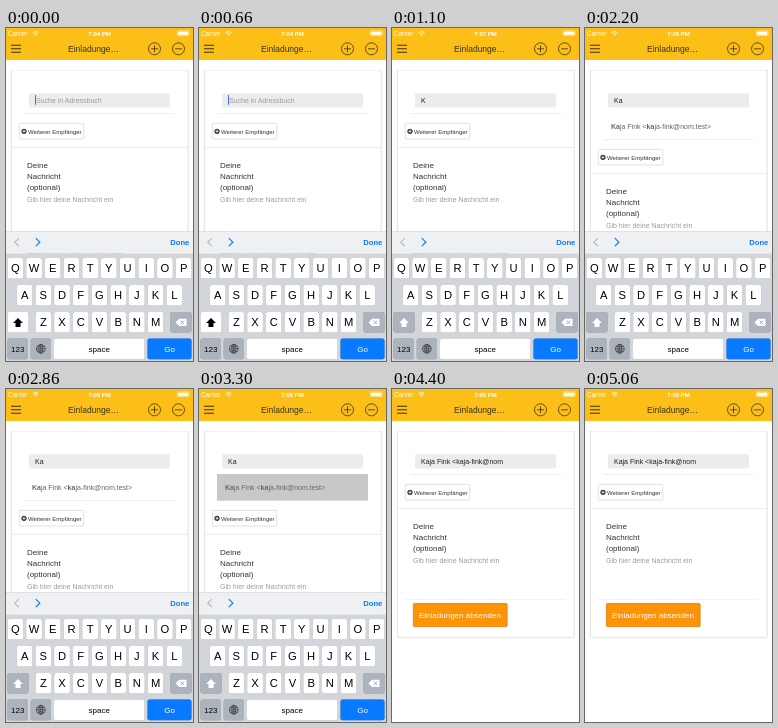
An HTML page that plays this animation: 187 px wide and 333 px high, repeating every 5.5 s.

```html
<!DOCTYPE html>
<html lang="de">
<head>
<meta charset="utf-8">
<title>Einladungen</title>
<style>
html, body { margin: 0; width: 100%; height: 100%; overflow: hidden; background: #fff; }
svg { display: block; width: 100%; height: 100%; }
text { font-family: "Liberation Sans", Arial, sans-serif; font-size: 7px; white-space: pre; }
.mid { text-anchor: middle; }
.bold { font-weight: 700; }
.line { fill: none; stroke: #3b3217; stroke-width: .8; }
.hint { fill: #9b9b9b; }
.label { font-size: 8px; fill: #333; }
.panel { fill: #fff; filter: drop-shadow(0 .7px .7px #0004); }
.key { filter: drop-shadow(0 .7px 0 #868a90); }
.letter { font-size: 11.2px; text-anchor: middle; }
.cap { font-size: 8px; text-anchor: middle; }

/* --from: first step of five, the class sets how many steps it stays */
.for1, .for2, .for3, .for4 {
  animation: 5.5s step-end calc((var(--from) - 5) * 1.1s) infinite;
}
.for1 { animation-name: one; }
.for2 { animation-name: two; }
.for3 { animation-name: three; }
.for4 { animation-name: four; }
@keyframes one   { 0% { visibility: visible } 20%, 100% { visibility: hidden } }
@keyframes two   { 0% { visibility: visible } 40%, 100% { visibility: hidden } }
@keyframes three { 0% { visibility: visible } 60%, 100% { visibility: hidden } }
@keyframes four  { 0% { visibility: visible } 80%, 100% { visibility: hidden } }

#form { animation: push 5.5s step-end infinite; }
@keyframes push {
  0%, 80%, 100% { transform: translateY(0) }
  40% { transform: translateY(26px) }
}
</style>
</head>
<body>
<svg viewBox="0 0 187 333" preserveAspectRatio="none">
  <rect width="187" height="333" fill="#fff"/>

  <!-- card -->
  <g id="form">
    <path d="M5.3 15V247.3Q5.3 248.3 6.3 248.3H181.2Q182.2 248.3 182.2 247.3V15" fill="none" stroke="#dadada" stroke-width=".8"/>
    <path d="M6 249H181.5" stroke="#eee" stroke-width=".7"/>
    <rect x="13.3" y="95.4" width="64.4" height="15.6" rx=".8" fill="#fff" stroke="#d5d5d5" stroke-width=".7"/>
    <circle cx="18" cy="103.3" r="2.6" fill="#333"/>
    <path d="M16.5 103.3h3M18 101.8v3" stroke="#fff" stroke-width=".8"/>
    <text x="22" y="105.5" style="font-size:6px" fill="#333">Weiterer Empfänger</text>
    <path d="M5.5 119.4H182" stroke="#e2e2e2" stroke-width=".7"/>
    <text class="label" x="21" y="140">Deine</text>
    <text class="label" x="21" y="151.2">Nachricht</text>
    <text class="label" x="21" y="162.2">(optional)</text>
    <text class="hint" x="21" y="173.5">Gib hier deine Nachricht ein</text>
    <path d="M13 210.5H174" stroke="#ddd" stroke-width=".6" stroke-dasharray="1.5 1"/>
    <rect x="21.4" y="214.4" width="93.7" height="23.2" rx="1" fill="#fd9408" stroke="#dd7d05" stroke-width=".8"/>
    <text x="27" y="229.3" style="font-size:8px" fill="#fff">Einladungen absenden</text>
  </g>
  <rect y="32" width="187" height="10" fill="#fff"/>
  <path d="M5.5 42.5H182" stroke="#ddd" stroke-width=".6" stroke-dasharray="1.5 1"/>

  <!-- recipient field -->
  <rect class="panel" x="18" y="57" width="151" height="28.5" rx=".5"/>
  <g class="for2" style="--from:2">
    <rect class="panel" x="18" y="57" width="151" height="54.5" rx=".5"/>
    <rect class="for1" style="--from:3" x="18" y="85" width="151" height="26.5" fill="#c8c8c8"/>
    <text x="26" y="101" fill="#666"><tspan class="bold">Ka</tspan>ja Fink &lt;<tspan class="bold">ka</tspan>ja-fink@nom.test&gt;</text>
  </g>
  <rect x="23" y="65.3" width="141" height="14.2" rx="1.5" fill="#ececed"/>
  <g class="for1" style="--from:0">
    <text class="hint" x="30" y="74.5">Suche in Adressbuch</text>
    <rect x="29" y="67" width="1" height="9.8" fill="#4b6fe0"/>
  </g>
  <g fill="#222">
    <text class="for1" style="--from:1" x="29" y="74.7">K</text>
    <text class="for2" style="--from:2" x="29" y="74.7">Ka</text>
    <text class="for1" style="--from:4" x="29" y="74.7">Kaja Fink &lt;kaja-fink@nom</text>
  </g>

  <!-- status and title -->
  <rect width="187" height="32" fill="#fcbf18"/>
  <g fill="#fff">
    <text x="2" y="7.6" style="font-size:6.3px">Carrier</text>
    <g fill="none" stroke="#fff" stroke-width=".9">
      <path d="M26.6 4.6Q29.6 1.9 32.6 4.6M27.8 6Q29.6 4.5 31.4 6"/>
    </g>
    <circle cx="29.6" cy="7.1" r=".7"/>
    <g class="mid bold" style="font-size:6px">
      <text class="for1" style="--from:0;font-size:6px" x="93.5" y="7.6">7:04 PM</text>
      <text class="for1" style="--from:1;font-size:6px" x="93.5" y="7.6">7:07 PM</text>
      <text class="for3" style="--from:2;font-size:6px" x="93.5" y="7.6">7:05 PM</text>
    </g>
    <rect x="171.3" y="3" width="11.6" height="4.5" rx=".7" fill="none" stroke="#fff" stroke-width=".5"/>
    <rect x="172" y="3.7" width="10.2" height="3.1" rx=".3"/>
    <path d="M183.5 4.3q1 .9 0 1.9z"/>
  </g>
  <path class="line" style="stroke-width:1.1" d="M5 17.3H15M5 20.8H15M5 24.3H15"/>
  <text x="62" y="24" style="font-size:8.5px" fill="#3b3217">Einladunge…</text>
  <g class="line">
    <circle cx="148.5" cy="20.8" r="6"/>
    <circle cx="172.5" cy="20.8" r="6"/>
    <path d="M145 20.8h7M148.5 17.3v7M169 20.8h7"/>
  </g>

  <!-- keyboard -->
  <g class="for4" style="--from:0">
    <rect y="203.5" width="187" height="22" fill="#eff0f2"/>
    <rect y="203.5" width="187" height=".5" fill="#c9cbce"/>
    <rect y="225.5" width="187" height="107.5" fill="#d2d5da"/>
    <g fill="none" stroke-width="1.2">
      <path d="M12.8 210.2L8.8 214.2L12.8 218.2" stroke="#b5b8bd"/>
      <path d="M29.8 210.2L33.8 214.2L29.8 218.2" stroke="#087aff"/>
    </g>
    <text class="bold" x="164.3" y="217.2" style="font-size:7.6px" fill="#087aff">Done</text>
    <g id="keys"></g>
    <path d="M12 290L17 295H14.5V299H9.5V295H7Z" fill="#fff"/>
    <g class="for1" style="--from:0">
      <rect x="1.5" y="284" width="21" height="20.6" rx="2" fill="#fff"/>
      <path d="M12 290L17 295H14.5V299H9.5V295H7Z" fill="#000"/>
    </g>
    <path d="M169.5 294.4L173 290.7H180.5V298.1H173Z" fill="#fff"/>
    <path d="M174.6 292.6l3.6 3.6m0-3.6l-3.6 3.6" stroke="#8e959f" stroke-width=".8"/>
    <g fill="none" stroke="#222" stroke-width=".6">
      <circle cx="34.8" cy="320.8" r="4.4"/>
      <ellipse cx="34.8" cy="320.8" rx="2" ry="4.4"/>
      <path d="M30.4 320.8h8.8M34.8 316.4v8.8M31.3 318.3q3.5 1.2 7 0M31.3 323.3q3.5-1.2 7 0"/>
    </g>
  </g>
</svg>
<script>
const keys = document.getElementById("keys");

function add(tag, attrs, content = "") {
  const el = document.createElementNS("http://www.w3.org/2000/svg", tag);
  for (const name in attrs) el.setAttribute(name, attrs[name]);
  el.textContent = content;
  keys.append(el);
}

function key(x, y, width, label = "", fill = "#fff", ink = "#000", style = "cap") {
  add("rect", { class: "key", x, y, width, height: 20.6, rx: 2, fill });
  const base = y + (style === "letter" ? 14.3 : 13.2);
  add("text", { class: style, x: x + width / 2, y: base, fill: ink }, label);
}

const rows = [["QWERTYUIOP", 1.5, 230], ["ASDFGHJKL", 10.8, 257], ["ZXCVBNM", 29.5, 284]];
for (const [letters, left, y] of rows) {
  [...letters].forEach((c, i) => key(left + i * 18.7, y, 15.7, c, "#fff", "#000", "letter"));
}

const gray = "#acb3bd";
key(1.5, 284, 21, "", gray);
key(164.5, 284, 21, "", gray);
key(1.5, 310.6, 20.5, "123", gray);
key(24.7, 310.6, 20.3, "", gray);
key(48, 310.6, 90.5, "space");
key(141.5, 310.6, 44, "Go", "#087aff", "#fff");
</script>
</body>
</html>
```
